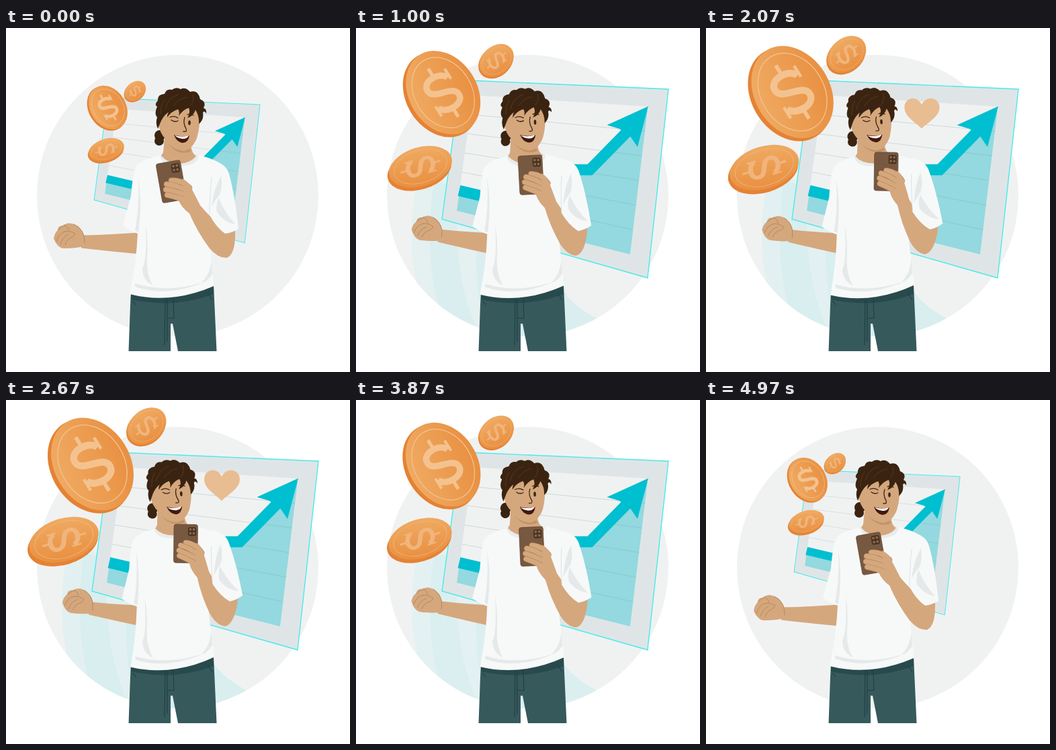
An HTML page for the animation above (5000 ms loop, 512x512 px).

```html
<!DOCTYPE html>
<html lang="en">
<head>
<meta charset="utf-8">
<style>
html, body { margin: 0; width: 100%; height: 100%; overflow: hidden; background: #fff; }
svg { display: block; width: 100vw; height: 100vh; }
.skin { fill: #d5a77d; }
.hair { fill: #3a2411; }
.fold { fill: #e6e9ea; }
.line { fill: none; stroke: #b3865b; stroke-width: .9; stroke-linecap: round; }
.ink { fill: none; stroke: #3a2411; stroke-width: 1.3; stroke-linecap: round; }
.seam { fill: none; stroke: #203f42; stroke-width: 1.1; }
</style>
</head>
<body>
<svg viewBox="0 0 512 512">
  <defs>
    <clipPath id="disc"><circle cx="255.5" cy="249.5" r="209.5"/></clipPath>
    <linearGradient id="gold" x1="0" y1="0" x2="1" y2=".3">
      <stop offset="0" stop-color="#f0ae66"/><stop offset="1" stop-color="#e99143"/>
    </linearGradient>
  </defs>
  <circle cx="255.5" cy="249.5" r="209.5" fill="#f0f2f2"/>

  <g id="beams" clip-path="url(#disc)">
    <path fill="#e3f0f1" d="M92 225C78 290 80 350 97 405L180 470H330L358 432Q325 415 309 392L200 300 135 225Z"/>
    <path fill="#d8eeef" d="M116 225C106 300 108 360 124 420L160 470H190C155 400 146 330 152 240Z"/>
    <path fill="#d8eeef" d="M180 300Q174 380 195 470H330L358 432Q325 415 309 392Z"/>
  </g>

  <g id="chart">
    <path fill="#dfe5e6" stroke="#4beaea" stroke-width="1.4" d="M156 77.500L465 91 434 372 128 284.500Z"/>
    <path fill="#f0f2f2" d="M174 100L435 117 408 337 150 272Z"/>
    <path fill="#93d9df" d="M154 242L230 260 290 211H348L434 122 408 337 150 272Z"/>
    <path id="grid" fill="none" stroke="#7f9ca2" stroke-opacity=".3"/>
    <path fill="none" stroke="#00bfd0" stroke-width="16.500" d="M153.500 242L230 260 290 211H348L404 154"/>
    <path fill="#00bfd0" d="M435 116.500L373.500 144.500 392 150 408 161 419 177Z"/>
  </g>
  <path id="heart" fill="#e9bd92" d="M0 24C-10 14-26 6-26-8C-26-23-7-27 0-12C7-27 27-23 27-8C27 6 10 14 0 24Z"/>
  <g id="coins"></g>

  <g id="fist">
    <path class="skin" d="M112 308.500Q160 308 215 303V338Q160 333 112 327.500Z"/>
    <path class="skin" d="M71 314Q72 305 77 301Q77 294 85 294Q92 288 101 292Q112 296 116 308L118 324Q108 328 85 328Q77 327 71 314Z"/>
    <path class="line" d="M77 301Q82 296 87 294M75 318Q78 306 87 303M81 322Q84 311 93 307M88 323Q90 314 99 311L103 306Q95 301 87 303M86 293Q92 296 94 301M101 292Q112 297 116 309L117 320"/>
  </g>

  <path fill="#36595c" d="M186 393L185 412 182.500 481H245V440L248 440 256 481H313.500L309 382Z"/>
  <path fill="#284a4d" d="M186 390V404Q250 418 309 396V382Z"/>
  <path class="seam" d="M237 401L236 472M240 401V467M249 402L250 432H239M300 394L307 405M188 406L193 412"/>

  <g id="body">
    <path fill="#f7f9f9" d="M235 189Q200 195 193 207Q188 222 186 250L174 294Q184 302 196 306Q194 350 184 396Q245 412 309.500 384L302 310 312 290 330 212Q320 196 281 188Z"/>
    <path class="fold" d="M208 292Q210 345 203 358Q203 375 218 383Q209 365 210 345Q212 315 208 292ZM306 345Q303 370 288 381Q300 378 307 366ZM192 380Q240 396 298 377Q240 402 192 385ZM197 222Q199 265 192 301L197 304Q203 260 197 222Z"/>
  </g>

  <g id="head">
    <path fill="#e8ecec" d="M229 190Q232 206 257 206Q284 205 287 191L280 186 235 187Z"/>
    <path class="skin" d="M237 155L234 185 231 190Q240 201 257 202Q276 201 283 190Q276 188 275 170Z"/>
    <path fill="#c29468" d="M240 170Q252 186 274 180L275 184Q254 191 240 170Z"/>
    <circle class="hair" cx="229" cy="160" r="8"/><circle class="hair" cx="228" cy="168" r="7"/>
    <path class="skin" d="M231 122L288 118Q290 144 284 164Q277 181 264 183Q247 181 238 166Q228 156 227 141Q226 134 232 134Z"/>
    <path class="hair" d="M226 150Q222 142 225 133Q220 128 225 117Q220 114 226 108Q225 99 236 98Q239 90 247 92Q253 87 260 91Q267 87 274 95Q286 91 289 106Q299 110 294 119Q299 121 298 127Q295 122 293 126Q295 136 287 143Q288 131 282 122Q279 131 270 134Q275 126 272 119Q264 121 257 131Q259 124 256 121Q246 124 240 133Q240 128 242 125Q235 130 231 138Z"/>
    <path fill="none" stroke="#5a3d22" stroke-width=".8" d="M237 120Q242 103 257 99M249 116Q258 104 270 103M274 116Q281 109 278 99M230 128Q230 115 236 107"/>
    <path class="ink" d="M246 137Q251 141 256 138M244 133Q250 130 256 134M270 129Q274 127 279 130"/>
    <path class="ink" stroke-width=".9" d="M266 133Q263 141 268 150Q270 155 264 154"/>
    <ellipse cx="273" cy="141" rx="1.800" ry="3.600" fill="#3a2411"/>
    <path fill="#42180f" d="M250 159Q262 163 273 160Q271 171 263 171Q254 170 250 159Z"/>
    <path fill="#fff" d="M251 160Q262 163 272 160Q270 165 263 165Q255 164 251 160Z"/>
  </g>

  <g id="arm">
    <g transform="translate(246 228.500) rotate(-10)">
      <rect x="-18.200" y="-29.500" width="36.500" height="59" rx="3.500" fill="#775840" stroke="#5f432e" stroke-width=".7"/>
      <rect x="3.500" y="-25.500" width="12.500" height="13.500" rx="3" fill="#4a3322"/>
      <g fill="#8b6a4e"><circle cx="7" cy="-22" r="1.900"/><circle cx="12.300" cy="-22" r="1.900"/><circle cx="7" cy="-16" r="1.900"/><circle cx="12.300" cy="-16" r="1.900"/></g>
    </g>
    <g id="fingers" fill="none" stroke-linecap="round"></g>
    <path class="skin" d="M262 224Q272 229 275 237Q281 248 289 264Q304 282 325 299L338 284 341 302Q342 336 329 342Q316 343 303 328Q285 304 273 276Q262 268 257 257L266 253Z"/>
  </g>
  <g id="sleeve">
    <path fill="#f7f9f9" d="M306 198Q326 200 332 217Q341 250 346 299Q336 305 326 306Q312 296 303 278V235Z"/>
    <path class="fold" d="M320 220Q309 240 306 266Q312 255 318 248Q311 264 314 274Q325 290 341 292Q326 276 316 252Q323 240 320 220Z"/>
    <path fill="none" stroke="#dde2e3" d="M306 222Q303 250 303 278"/>
  </g>
</svg>
<script>
const LOOP = 5000, PEAK = 2420;
const $ = id => document.getElementById(id);
const mix = (a, b, k) => a + (b - a) * k;
const place = (el, s) => el.setAttribute("transform", s);
const ease = (t, a, b) => (1 - Math.cos(Math.PI * Math.min(1, Math.max(0, (t - a) / (b - a))))) / 2;

// Smooth curve through four poses spread over half a loop.
const STOPS = [0, .24, .62, 1];
function pose(p, ...v) {
  const i = p < STOPS[1] ? 0 : p < STOPS[2] ? 1 : 2;
  const w = STOPS[i + 1] - STOPS[i], k = (p - STOPS[i]) / w;
  const slope = j => j % 3 ? (v[j + 1] - v[j - 1]) / (STOPS[j + 1] - STOPS[j - 1]) : 0;
  const h = k * k * (3 - 2 * k);
  return mix(v[i], v[i + 1], h) + w * k * (1 - k) * ((1 - k) * slope(i) - k * slope(i + 1));
}

let rows = "";
for (let i = 1; i < 6; i++) {
  const k = i / 6;
  rows += `M${mix(174, 150, k)} ${mix(100, 272, k)}L${mix(435, 408, k)} ${mix(117, 337, k)}`;
}
$("grid").setAttribute("d", rows);

$("fingers").innerHTML = ["M246 227Q262 226 273 238", "M239 232.500Q255 234 268 242", "M238 240.500Q252 243 266 248", "M240 248.500Q252 251 264 255"]
  .map(d => `<path d="${d}" stroke="#b3865b" stroke-width="8.600"/><path d="${d}" stroke="#d5a77d" stroke-width="7.400"/>`).join("");

// path: x, y, size when closed, popped and fully grown
const coins = [
  { turn: -32, rx: 50, ry: 65, edge: [-3.5, 3], mark: "#f4c28f", path: [[151, 119, .54], [128.5, 98, .99], [126.5, 97, 1.15]] },
  { turn: 50, rx: 21, ry: 27.5, edge: [-1, 2], mark: "#f1b47c", path: [[192, 94.5, .64], [208.5, 53, .99], [209, 39.5, 1.18]] },
  { turn: 73, rx: 28.5, ry: 47.5, edge: [-1.5, 4.5], mark: "#f1b47c", path: [[149, 182.5, .58], [99, 208, .99], [85, 210.5, 1.14]] }
];
$("coins").innerHTML = coins.map(({ turn, rx, ry, mark, edge: [x, y] }) => `<g>
  <ellipse rx="${rx}" ry="${ry}" fill="#e58234" transform="translate(${x / 2} ${y / 2}) rotate(${turn})"/>
  <g transform="translate(${-x / 2} ${-y / 2}) rotate(${turn}) scale(${rx / 50} ${ry / 65})" fill="none" stroke="${mark}">
    <ellipse rx="49" ry="64" fill="url(#gold)" stroke="none"/>
    <ellipse rx="41" ry="54" stroke-width="1.200"/>
    <path stroke-width="9" d="M17-15C12-29-18-30-18-14C-18 3 18-3 18 14C18 30-13 29-18 15"/>
    <path stroke-width="5" d="M0-41V-24M0 24V41"/>
    <path stroke-width="4" d="M20-28V-11M-20 28V11"/>
  </g></g>`).join("");
const coinEls = [...$("coins").children];

function draw(t) {
  const p = t < PEAK ? t / PEAK : (LOOP - t) / (LOOP - PEAK);
  const open = ease(t, 0, 620) * (1 - ease(t, 4400, 4970));
  const pop = ease(t, 0, 520) * (1 - ease(t, 4710, 4970));
  const grow = ease(p, .1, 1);

  $("beams").setAttribute("opacity", open * mix(.8, 1, grow));
  place($("chart"), `translate(139.300 177) scale(${mix(.733, 1, open)}) translate(-139.300 -177)`);
  const beat = ease(t, 1700, 2100) * (1 - ease(t, 2950, 3350));
  place($("heart"), `translate(321 126) scale(${beat})`);

  coins.forEach(({ path: [a, b, c] }, i) => {
    const [x, y, s] = a.map((v, j) => mix(v, mix(b[j], c[j], grow), pop));
    place(coinEls[i], `translate(${x} ${y}) scale(${s})`);
  });

  const sway = pose(p, 0, .27, .79, 1);
  place($("body"), `translate(${sway} 0) rotate(${-1.5 * sway} 247 395)`);
  place($("head"), `translate(${-10 * sway} ${-.5 * sway}) rotate(${-4 * sway} 258 175)`);
  place($("fist"), `translate(${pose(p, 0, 10.5, 8, 12)} ${sway}) rotate(${pose(p, 0, 4.5, 8.5, 6)} 192 320)`);
  const lift = pose(p, 0, .3, 1, 1);
  place($("arm"), `translate(${325 + pose(p, 0, 0, 2, 0)} ${325 - 5 * lift}) rotate(${10.5 * lift}) scale(${1 - .03 * lift}) translate(-325 -325)`);
  place($("sleeve"), `translate(${-2 * sway} ${-5 * lift}) rotate(${-5 * lift} 318 205)`);
}

const start = performance.now();
function tick() {
  draw((performance.now() - start) % LOOP);
  requestAnimationFrame(tick);
}
tick();
</script>
</body>
</html>
```
